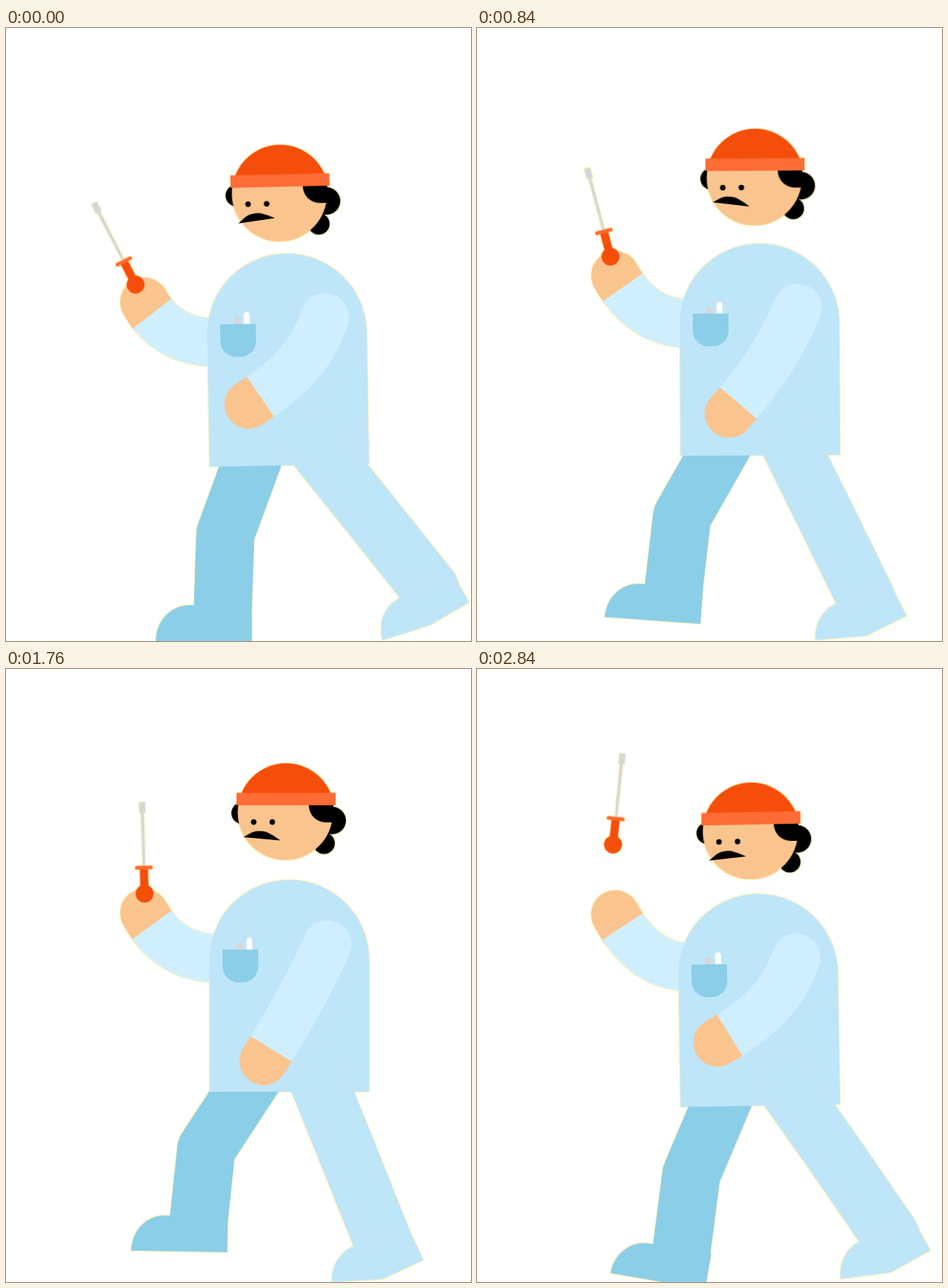
Animation of 625 by 824 pixels, one loop 2880 ms. Source, as an HTML page without scripts:

```html
<!DOCTYPE html>
<html lang="en">
<head>
<meta charset="utf-8">
<title>Walking handyman</title>
<style>
html, body { margin: 0; width: 100%; height: 100%; overflow: hidden; background: #fff; }
svg { display: block; width: 100vw; height: 100vh; }

:root { --step: 480ms; --walk: 960ms; --loop: 2880ms; }

.shirt { fill: #bfe5f8; stroke: #bfe5f8; }
.dark { fill: #8bcee8; stroke: #8bcee8; }
.skin { fill: #fac48e; }
.red { fill: #f54e0b; }
.coral { fill: #ff6c36; }
.grey { fill: #d6d6da; }

/* Body and head bob once per step */
.body { transform-origin: 381px 568px; animation: body var(--step) linear infinite; }
@keyframes body {
  0%, 100% { transform: translateY(20px) rotate(-1deg); }
  16.67% { transform: translateY(9px) rotate(-.25deg); }
  25% { transform: translateY(-1px) rotate(0deg); }
  41.67% { transform: translateY(-11.5px) rotate(.8deg); }
  50% { transform: translateY(-12px) rotate(.8deg); }
  66.67% { transform: translateY(0) rotate(0deg); }
  91.67% { transform: translateY(19px) rotate(-.9deg); }
}
.head { transform-origin: 376px 192px; animation: head var(--step) linear infinite; }
@keyframes head {
  0%, 100% { transform: translate(-8px, 30.5px) rotate(-1.3deg); }
  16.67% { transform: translate(-4px, 25px) rotate(0deg); }
  25% { transform: translate(0, 19px) rotate(.3deg); }
  41.67% { transform: translate(4px, -5px) rotate(1.2deg); }
  50% { transform: translate(4.3px, -8px) rotate(1.2deg); }
  66.67% { transform: translate(0, 0) rotate(0deg); }
  91.67% { transform: translate(-8px, 26px) rotate(-1.1deg); }
}
.moustache { transform-origin: 344px 227px; animation: wiggle 120ms -8ms ease-in-out infinite alternate; }
@keyframes wiggle { from { transform: rotate(-7deg); } to { transform: rotate(7deg); } }
.open { animation: open var(--loop) step-end infinite; }
.shut { animation: shut var(--loop) step-end infinite; }
@keyframes open { 0%, 22.2% { opacity: 1; } 18% { opacity: 0; } }
@keyframes shut { 0%, 22.2% { opacity: 0; } 18% { opacity: 1; } }

/* Legs share one cycle, half a turn apart */
.limb { fill: none; stroke-width: 78; stroke-linejoin: round; stroke-linecap: round; animation: limb var(--walk) linear infinite; }
.foot { stroke: none; animation: foot var(--walk) linear infinite, toe var(--walk) linear infinite; }
.near .limb, .near .foot { animation-delay: -480ms; }
@keyframes limb {
  0%, 100% { d: path("M340 557L294.5 680L291 781"); }
  8.333% { d: path("M341 546L320 678L322 781"); }
  12.5% { d: path("M341 536L339 682L341 781"); }
  20.833% { d: path("M340 525L363 660L383 775"); }
  33.333% { d: path("M341 537L389 656L435 772"); }
  45.833% { d: path("M340 556L412 658L484 763"); }
  50% { d: path("M340 557L419 654L499 755"); }
  58.333% { d: path("M340 546L350 664L432 712"); }
  62.5% { d: path("M340 536L320 653L395 703"); }
  70.833% { d: path("M340 525L280 625L327 706"); }
  83.333% { d: path("M340 537L269 645L259 740"); }
  95.833% { d: path("M340 556L288 679L274 785"); }
}
@keyframes foot {
  0%, 100% { transform: translate(291px, 781px) rotate(0deg); }
  8.333% { transform: translate(322px, 781px) rotate(0deg); }
  12.5% { transform: translate(341px, 781px) rotate(0deg); }
  20.833% { transform: translate(383px, 775px) rotate(-19deg); }
  33.333% { transform: translate(435px, 772px) rotate(-25deg); }
  45.833% { transform: translate(482px, 763px) rotate(-29deg); }
  50% { transform: translate(496px, 755px) rotate(-30deg); }
  58.333% { transform: translate(432px, 712px) rotate(-45deg); }
  62.5% { transform: translate(395px, 700px) rotate(-45deg); }
  70.833% { transform: translate(327px, 706px) rotate(-33deg); }
  83.333% { transform: translate(259px, 740px) rotate(1deg); }
  95.833% { transform: translate(275px, 785px) rotate(10deg); }
}
@keyframes toe {
  0%, 12.5%, 56%, 100% { d: path("M39 43L-22 43L-90 43C-90 16 -70 -5 -45 -5L39 -5Z"); }
  20.833%, 45.833% { d: path("M39 43L-22 43L-85 18C-74 -8 -47 -20 -23 -10L39 -5Z"); }
}

/* Each arm is one curve from hand to shoulder; the dash leaves the hand bare */
.hand, .sleeve { fill: none; stroke-width: 65; }
.hand { stroke: #fac48e; stroke-linecap: round; stroke-dasharray: 22 999; }
.sleeve { stroke: #cfefff; stroke-dasharray: 0 19 999; }
.swing { animation: swing var(--walk) linear infinite; }
@keyframes swing {
  0%, 100% { d: path("M327 485C378 454 412 425 432 370"); }
  20.833% { d: path("M417.5 557C424 495 430 430 432 370"); animation-timing-function: ease-out; }
  47% { d: path("M514 504C500 450 470 412 432 370"); animation-timing-function: ease-in; }
  58.333% { d: path("M490 519.5C483 464 459 410 432 370"); }
  62.5% { d: path("M469 536C467 486 452 416 432 370"); }
  83.333% { d: path("M346.5 527C374 483 410 420 432 370"); }
  95.833% { d: path("M324.5 482C377 453 412 425 432 370"); }
}
.reach { animation: reach var(--loop) linear infinite; }
@keyframes reach {
  0%, 100% { d: path("M186 368C202 398 232 423 285 423"); }
  2.78% { d: path("M186 376C202 406 232 425 285 425"); }
  8.33% { d: path("M186 348C202 378 232 395 285 395"); }
  19.44% { d: path("M186 322C202 352 232 391 285 391"); }
  30.56% { d: path("M186 334C202 364 232 398 285 398"); }
  40.28% { d: path("M186 325C202 355 232 381 285 381"); }
  50% { d: path("M186 332C202 362 232 398 285 398"); }
  61.11%, 63.89% { d: path("M186 328C202 358 232 389 285 389"); }
  69.44%, 75% { d: path("M152 415C205 416 255 403 300 377"); }
  77.78% { d: path("M162 385C200 404 240 402 290 385"); }
  80.56% { d: path("M186 297C202 327 232 373 285 373"); }
  81.94% { d: path("M186 288C202 318 232 367 285 367"); }
  87.5% { d: path("M186 297C202 327 232 373 285 373"); }
  98.61% { d: path("M186 329C202 359 232 400 285 400"); }
}

/* Screwdriver: held, thrown as a spinning blur, caught */
.tool { animation: tool var(--loop) linear infinite, held var(--loop) step-end infinite; }
@keyframes tool {
  0%, 100% { transform: translate(186px, 368px) rotate(-27deg); }
  2.78% { transform: translate(186px, 376px) rotate(-28deg); }
  8.33% { transform: translate(186px, 348px) rotate(-18deg); }
  19.44% { transform: translate(186px, 322px) rotate(1.3deg); }
  30.56% { transform: translate(186px, 334px) rotate(-17deg); }
  40.28% { transform: translate(186px, 325px) rotate(-2.3deg); }
  50% { transform: translate(186px, 332px) rotate(-4deg); }
  61.11%, 63.89% { transform: translate(187px, 328px) rotate(-1.6deg); }
  69.44%, 75% { transform: translate(151px, 413.5px) rotate(-93.8deg); }
  77.78% { transform: translate(162px, 385px) rotate(-76deg); }
  80.56% { transform: translate(186px, 297px) rotate(-14deg); }
  98.61% { transform: translate(180px, 259px) rotate(6.8deg); }
}
@keyframes held { 0%, 97.92% { opacity: 1; } 81.25% { opacity: 0; } }
.drift { animation: drift var(--loop) linear infinite, thrown var(--loop) step-end infinite; }
@keyframes drift {
  0%, 81.944% { transform: translateX(163px); }
  98.611%, 100% { transform: translateX(190px); }
}
@keyframes thrown { 0%, 97.92% { opacity: 0; } 81.25% { opacity: 1; } }
.rise { animation: rise var(--loop) linear infinite; }
@keyframes rise {
  0%, 81.944% { transform: translateY(178px); animation-timing-function: cubic-bezier(.333, .667, .667, 1); }
  90.278% { transform: translateY(63.3px); animation-timing-function: cubic-bezier(.333, 0, .667, .333); }
  98.611%, 100% { transform: translateY(178px); }
}
.spin { animation: spin 240ms -120ms linear infinite; }
@keyframes spin { from { transform: rotate(-180deg); } to { transform: rotate(180deg); } }
</style>
</head>
<body>
<svg viewBox="0 0 625 824">
  <defs>
    <filter id="halo" filterUnits="userSpaceOnUse" x="0" y="0" width="625" height="824" color-interpolation-filters="sRGB">
      <feMorphology in="SourceAlpha" operator="dilate" radius="1" result="grown"/>
      <feFlood flood-color="#fdf5c0"/>
      <feComposite in2="grown" operator="in" result="rim"/>
      <feMerge><feMergeNode in="rim"/><feMergeNode in="SourceGraphic"/></feMerge>
    </filter>
    <clipPath id="crown"><rect x="300" y="120" width="160" height="50"/></clipPath>
  </defs>

  <g filter="url(#halo)">
    <path class="hand reach"/>
    <path class="sleeve reach"/>

    <g class="tool">
      <path class="grey" d="M-1.3 -62L-2 -135H2L1.8 -62ZM-4 -149H4V-135H-4Z"/>
      <rect class="red" x="-5.5" y="-60" width="11" height="34"/>
      <rect class="coral" x="-12" y="-63.5" width="24" height="5" rx="2.5"/>
      <circle class="red" cy="-26" r="12"/>
    </g>

    <g class="drift"><g class="rise"><g class="spin">
      <path class="red" d="M-8 71A71.5 71.5 0 1 0 -30 65Q-24 67.5 -19 66.5Q-14 65 -8 71Z"/>
      <path d="M-10.4 22.2A24.5 24.5 0 1 1 23.7 6.3" fill="none" stroke="#ff6c36" stroke-width="4"/>
      <circle class="grey" r="18.3"/>
    </g></g></g>

    <g class="dark">
      <path class="limb"/>
      <path class="foot"/>
    </g>

    <g class="body">
      <path class="shirt" stroke="none" style="stroke:none" d="M273.5 568V387.5A107.3 107.5 0 0 1 488 387.5V568Z"/>
    </g>

    <g class="near shirt" transform="translate(72)">
      <path class="limb"/>
      <path class="foot"/>
    </g>

    <g class="body">
      <path class="grey" d="M309.5 378V371.5a4.5 4.5 0 0 1 9 0V378Z"/>
      <path fill="#fff" d="M323 378V365a4 4 0 0 1 8 0V378Z"/>
      <path fill="#8bcee8" d="M291 377H339V400A21 21 0 0 1 318 421H312A21 21 0 0 1 291 400Z"/>
      <path class="hand swing"/>
      <path class="sleeve swing"/>
      <circle cx="432" cy="370" r="32.5" fill="#cfefff"/>
    </g>

    <g class="head">
      <circle cx="317.5" cy="193.5" r="14.5"/>
      <circle cx="438.5" cy="203.5" r="18.5"/>
      <circle cx="427.5" cy="234" r="14.5"/>
      <circle class="skin" cx="375.5" cy="192.5" r="64"/>
      <path d="M407 180V183A23 23 0 0 0 430 206H440V180Z"/>
      <circle class="red" cx="376.5" cy="191.3" r="64.8" clip-path="url(#crown)"/>
      <rect class="coral" x="310" y="166.3" width="133" height="16.7"/>
      <g class="open">
        <circle cx="333" cy="205.5" r="3.7"/>
        <circle cx="358" cy="205.5" r="3.7"/>
      </g>
      <path class="shut" d="M327.5 205.5h11.5m13.5 0h11.5" stroke="#000" stroke-width="2.2"/>
      <path class="moustache" d="M319 228C326 224 331 219 337 218.3Q344 217 350 218.6Q359 222 369 228Z"/>
    </g>
  </g>
</svg>
</body>
</html>
```
